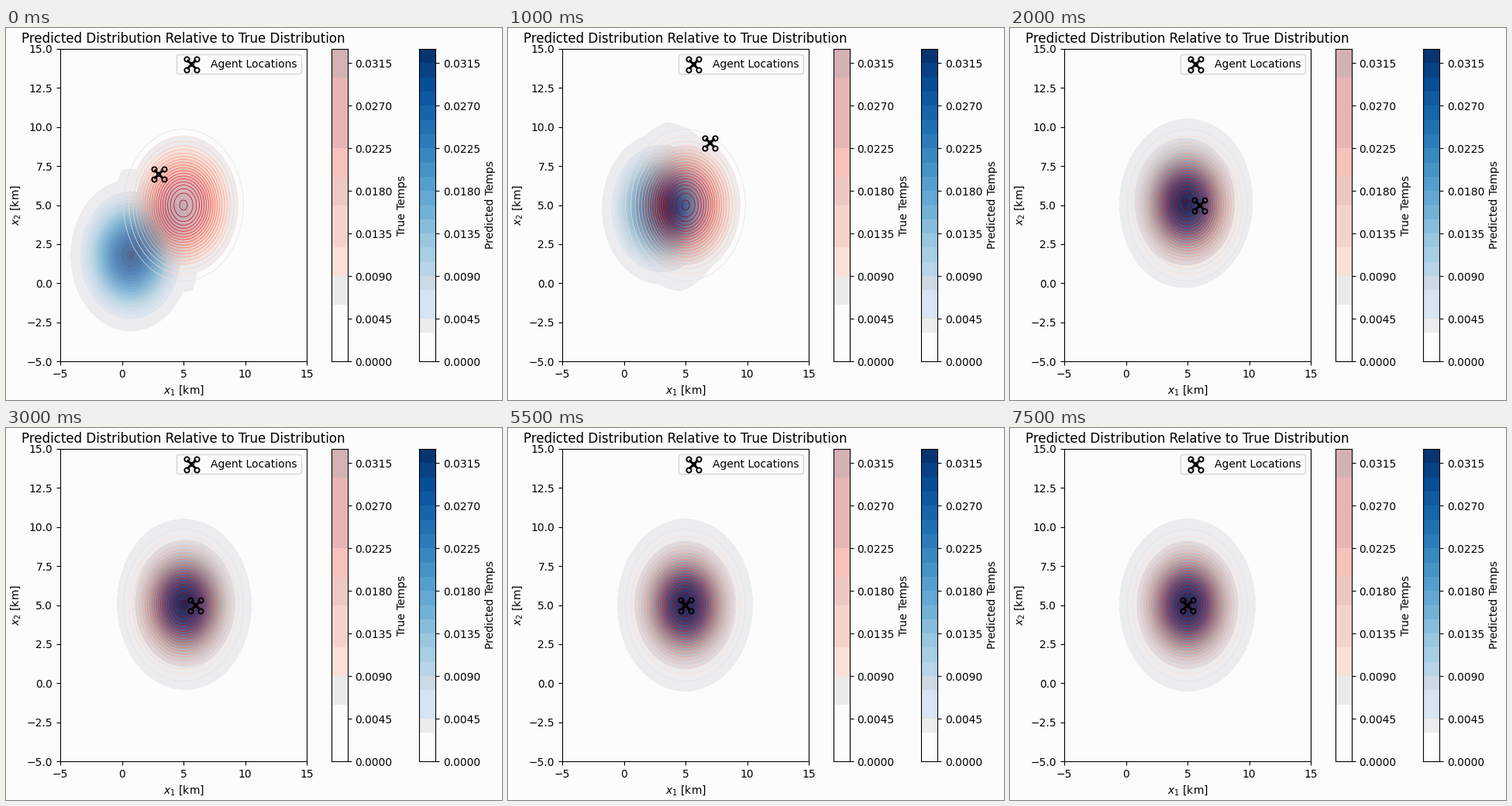
A matplotlib script for the animation above (8000 ms loop, 640 by 480 pixels).

```python
import numpy as np
import matplotlib.pyplot as plt
from matplotlib import colors
from matplotlib.animation import FuncAnimation

W, H, DPI = 640, 480, 100
PAPER, MIST = "#fcfcfc", "#ecebed"
STEP, BANDS = 0.0015, 22
VAR = 5.0
TRUE_MEAN = (5.0, 5.0)

# One entry per 500 ms step
AGENT = [(3, 7), (5, 8), (7, 9), (7, 7), (6, 5), (6, 5), (6, 5), (5, 5),
         (4, 5)] + [(5, 5)] * 7
MEAN = [(0.70, 1.78), (1.77, 3.34), (3.08, 4.78), (4.40, 5.20),
        (4.78, 5.22), (4.90, 5.12), (5.13, 5.10), (5.07, 5.06),
        (4.85, 5.04), (4.90, 5.01), (4.93, 5.00), (4.95, 5.00),
        (4.97, 5.00), (4.98, 5.00), (4.99, 5.00), (5.00, 5.00)]

plt.rcParams["font.family"] = "DejaVu Sans"
fig = plt.figure(figsize=(W / DPI, H / DPI), dpi=DPI, facecolor=PAPER)


def px_axes(x0, y0, x1, y1):
    """Axes placed by pixel corners, y measured from the top."""
    return fig.add_axes([x0 / W, 1 - y1 / H, (x1 - x0) / W, (y1 - y0) / H],
                        facecolor=PAPER)


def density(x, y, mean):
    r2 = (x - mean[0]) ** 2 + (y - mean[1]) ** 2
    return np.exp(-r2 / (2 * VAR)) / (2 * np.pi * VAR)


def band(z):
    return np.clip((z / STEP).astype(int), 0, BANDS - 1)


mids = (np.arange(BANDS) + 0.5) / BANDS
blues = plt.get_cmap("Blues")(mids)[:, :3]
reds = plt.get_cmap("Reds")(mids)[:, :3]

# Main plot
ax = px_axes(70, 27, 388, 430)
xs = -5 + 20 * (np.arange(318) + 0.5) / 318
ys = -5 + 20 * (np.arange(403) + 0.5) / 403
X, Y = np.meshgrid(xs, ys)
true_z = density(X, Y, TRUE_MEAN)
true_band = band(true_z)


def field(mean):
    pred = band(density(X, Y, mean))
    rgb = 0.7 * blues[pred] + 0.3 * reds[true_band]
    pale = (pred < 4) & (true_band < 5)
    seen = (pred >= 2) | (true_band >= 3) | ((pred >= 1) & (true_band >= 1))
    rgb[pale & seen] = colors.to_rgb(MIST)
    rgb[pale & ~seen] = colors.to_rgb(PAPER)
    return rgb


img = ax.imshow(field(MEAN[0]), extent=(-5, 15, -5, 15), origin="lower",
                aspect="auto", interpolation="nearest", zorder=0)
levels = STEP * np.arange(2, BANDS)
line_colors = ["#e2e0e2"] + [plt.get_cmap("Reds")(v / (STEP * BANDS))
                             for v in levels[1:]]
ax.contour(X, Y, true_z, levels=levels, colors=line_colors, linewidths=0.5)
ax.set(xlim=(-5, 15), ylim=(-5, 15), xticks=range(-5, 16, 5),
       yticks=np.arange(-5, 15.1, 2.5), xlabel="$x_1$ [km]",
       ylabel="$x_2$ [km]")
ax.set_title("Predicted Distribution Relative to True Distribution")
ax.plot([], [], " ", label="Agent Locations")
ax.legend(loc="upper right", facecolor=PAPER)


def color_bar(x0, x1, shades, label):
    bar = px_axes(x0, 27, x1, 430)
    top = STEP * BANDS
    bar.imshow(np.array(shades)[:, None, :], extent=(0, 1, 0, top),
               origin="lower", aspect="auto", interpolation="nearest")
    bar.set(xticks=[], ylim=(0, top), yticks=np.arange(8) * 0.0045)
    bar.yaxis.tick_right()
    bar.yaxis.set_label_position("right")
    bar.yaxis.set_major_formatter("{x:.4f}")
    bar.set_ylabel(label)


red_runs = [(PAPER, 4), ("#eaeaea", 2), ("#fbe0d8", 2), ("#f5d3cb", 3),
            ("#edc8c2", 2), ("#f8c1bc", 2), ("#e8b5b5", 5), ("#d4b1b3", 2)]
color_bar(420, 440.5, [colors.to_rgb(c) for c, n in red_runs
                       for _ in range(n)], "True Temps")
blue_low = [PAPER, PAPER, MIST, "#d7e4f3", "#d7e4f3", "#ced9e6"]
color_bar(533, 554, [colors.to_rgb(c) for c in blue_low] + list(blues[6:]),
          "Predicted Temps")

# Pixel overlay for the quadcopter icons
top_ax = fig.add_axes([0, 0, 1, 1], zorder=5)
top_ax.set(xlim=(0, W), ylim=(H, 0))
top_ax.axis("off")
PT = 72 / DPI
ROTORS = np.array([(-6.5, -6.7), (6.5, -6.7), (-6.5, 6.7), (6.5, 6.7)])
ARMS = np.array([(-4.6, -4.6), (4.6, 4.6), (np.nan, np.nan),
                 (-4.6, 4.6), (4.6, -4.6)])


class Drone:
    def __init__(self, x, y):
        rings, = top_ax.plot([], [], "o", ms=6.2 * PT, mfc="none",
                             mec="k", mew=1.9 * PT)
        arms, = top_ax.plot([], [], "k-", lw=3 * PT)
        body, = top_ax.plot([], [], "ks", ms=6 * PT, mew=0)
        self.parts = [(rings, ROTORS), (arms, ARMS), (body, np.zeros((1, 2)))]
        self.move(x, y)

    def move(self, x, y):
        for line, pts in self.parts:
            line.set_data(pts[:, 0] + x, pts[:, 1] + y)


Drone(239.5, 47)
agent = Drone(0, 0)


def update(i):
    x, y = AGENT[i]
    img.set_data(field(MEAN[i]))
    agent.move(70 + (x + 5) * 15.9, 430.5 - (y + 5) * 20.15)
    return []


anim = FuncAnimation(fig, update, frames=len(MEAN), interval=500,
                     repeat=True, repeat_delay=0)
plt.show()
```
